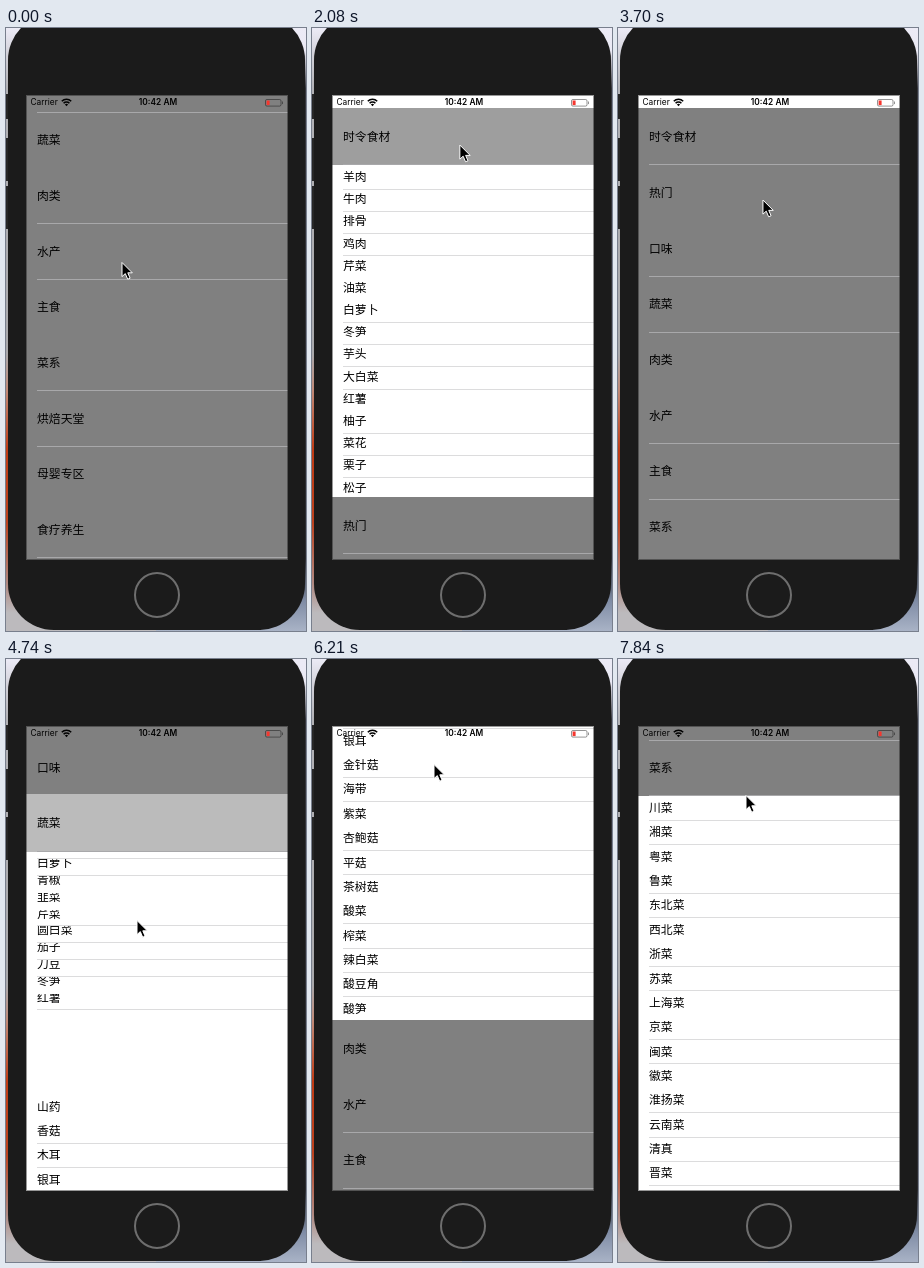
Write an HTML page that moves like this. It is 300 px wide and 603 px high and loops after 7.99 s.

```html
<!DOCTYPE html>
<html lang="zh-CN">
<head>
<meta charset="utf-8">
<title>分类列表</title>
<style>
html, body { margin: 0; width: 100%; height: 100%; overflow: hidden; }
body {
  position: relative;
  background: linear-gradient(#ecebf6, #b2b2b6 10%, #a9a9ac 54%, #c08a78 60%, #c03c16 70%, #bd4320 82%, #b08880 92%, #bcbabd 97%);
}
#desk {
  position: absolute; left: 150px; top: 0; width: 150px; height: 603px;
  background: linear-gradient(#ecebf6, #eae9f4 4%, #34343a 10%, #2a2a2e 88%, #7f8ca5 95%, #a9b3c6);
}
.key { position: absolute; left: 0; width: 4px; background: #262626; }
#phone {
  position: absolute; left: 2px; top: -14px; width: 297px; height: 616px;
  border-radius: 46px; background: #1b1b1b;
}
#home {
  position: absolute; left: 127.5px; top: 544px; width: 42px; height: 42px;
  border: 2px solid #6e6e6e; border-radius: 50%;
}
#screen {
  position: absolute; left: 20px; top: 67px; width: 262px; height: 465px;
  overflow: hidden; isolation: isolate; background: #fff;
}
#screen::after {
  content: ""; position: absolute; inset: 0; z-index: 999;
  box-shadow: inset 0 0 0 1px rgba(27, 27, 27, .45);
}
.cell {
  position: absolute; left: 0; top: 0; width: 262px; box-sizing: border-box;
  padding-left: 11px; white-space: nowrap; color: #000; background: #fff;
  font: 11.83px "Noto Sans CJK SC", "Noto Sans CJK", sans-serif;
}
.cell i { position: absolute; left: 11px; right: 0; bottom: 0; height: 1px; background: #dcdcdd; }
.head i { background: #a8a8aa; }
.row { line-height: 24px; }
.head { line-height: 56px; }
#bar {
  position: absolute; left: 0; top: 0; width: 262px; height: 14px; z-index: 900;
  font: 8.35px/15px Inter, sans-serif; color: #000;
}
#bar span { position: absolute; top: 0; white-space: nowrap; }
#bar svg { position: absolute; left: 0; top: 0; }
#clock { left: 82px; width: 100px; text-align: center; font-weight: 600; }
#mouse { position: absolute; left: 0; top: 0; overflow: visible; }
</style>
</head>
<body>
<div id="desk"></div>
<div class="key" style="top:66px;height:25px"></div>
<div class="key" style="top:110px;height:43px"></div>
<div class="key" style="top:158px;height:43px"></div>
<div id="phone"></div>
<div id="home"></div>
<div id="screen">
  <div id="bar">
    <span style="left:4.5px">Carrier</span>
    <span id="clock">10:42 AM</span>
    <svg width="262" height="14" fill="none">
      <g stroke="#000" stroke-width="1.6">
        <path d="M35.8 6.2a6.6 6.6 0 0 1 9.4 0M37.6 8.2a4.1 4.1 0 0 1 5.8 0"/>
        <path d="M40.5 11.2l-1.6-1.7a2.3 2.3 0 0 1 3.2 0z" fill="#000" stroke="none"/>
      </g>
      <rect x="239.5" y="4.5" width="15.5" height="6.6" rx="1.4" stroke="#000" stroke-opacity=".42"/>
      <path d="M256.5 6.5v2.6" stroke="#000" stroke-opacity=".42"/>
      <rect x="240.6" y="5.5" width="3" height="4.6" fill="#f5362e"/>
    </svg>
  </div>
</div>
<svg id="mouse" width="13" height="20">
  <path d="M1 1.5V15.6L4.3 12.6 6.7 18.2 9.1 17.2 6.8 11.8H11.3Z" fill="#000" stroke="#fff"/>
</svg>
<script>
const LOOP = 7990, TICKS = 54;
const HEAD = 55.68, ROW = 24.36, TOP = 13.8, VIEW = 465;
const OPEN = 3.85, REBUILD = 47;

const names = '时令食材 热门 口味 蔬菜 肉类 水产 主食 菜系 烘焙天堂 母婴专区 食疗养生'.split(' ');
const items = {
  0: '羊肉 牛肉 排骨 鸡肉 芹菜 油菜 白萝卜 冬笋 芋头 大白菜 红薯 柚子 菜花 栗子 松子',
  3: '白萝卜 青椒 韭菜 芹菜 圆白菜 茄子 刀豆 冬笋 红薯 土豆 山药 香菇 木耳 银耳 金针菇 海带 紫菜 杏鲍菇 平菇 茶树菇 酸菜 榨菜 辣白菜 酸豆角 酸笋',
  7: '川菜 湘菜 粤菜 鲁菜 东北菜 西北菜 浙菜 苏菜 上海菜 京菜 闽菜 徽菜 淮扬菜 云南菜 清真 晋菜 豫菜'
};

const easeOut = t => 1 - (1 - t) ** 1.6;
const smooth = t => t * t * (3 - 2 * t);
const frac = v => v - Math.floor(v);

function ramp(n, at, len, ease = smooth) {
  if (n >= at + len) return 1;
  return n <= at ? 0 : ease((n - at) / len);
}

// Times are in ticks of the loop
const taps = {
  0: { open: 11, close: 22, closeLen: 3 },
  3: { open: 30, close: REBUILD, closeLen: 0 },
  7: { open: 48, close: TICKS, closeLen: 0 }
};
const scrolls = [
  { at: 0, len: 7, y: -164.18 },
  { at: 30, len: 4, y: 3 * HEAD, ease: easeOut },
  { at: 37, len: 10, y: 767.8 },
  { at: REBUILD, len: 0, y: -917.54 },
  { at: 48, len: 3, y: 372.46, ease: easeOut }
];
const strokes = [
  { at: 0, len: 4, x: 1, y: 128 },
  { at: 4, len: 4, x: 3, y: -264 },
  { at: 11, len: 4, x: 33, y: 22 },
  { at: 17, len: 3, x: 1, y: -6.5 },
  { at: 22, len: 7, x: -23, y: 147.5 },
  { at: 34, len: 3, x: -4, y: 180 },
  { at: 37, len: 5, x: -5, y: -336 },
  { at: 42, len: 3, x: 0, y: 97 },
  { at: 52, len: 1, x: 6, y: -66 }
];
const travel = (moves, n, axis) =>
  moves.reduce((sum, m) => sum + m[axis] * ramp(n, m.at, m.len, m.ease), 0);

const openness = (tap, n) =>
  tap ? ramp(n, tap.open, OPEN, easeOut) - ramp(n, tap.close, tap.closeLen) : 0;
const glow = (tap, n) =>
  tap && n >= tap.open ? 1 - ramp(n, tap.open + 1, 3, t => t) : 0;

const screen = document.getElementById('screen');
const mouse = document.getElementById('mouse');

function cell(kind, text) {
  const el = document.createElement('div');
  el.className = 'cell ' + kind;
  el.textContent = text;
  const line = el.appendChild(document.createElement('i'));
  screen.append(el);
  return { el, line };
}

// Blank headers keep the list grey below the last name
const sections = [...names, '', '', ''].map((name, i) => ({
  head: cell('head', name),
  rows: items[i] ? ['', ...items[i].split(' ')].map(t => cell('row', t)) : [],
  fits: Math.floor((VIEW - TOP - (i + 1) * HEAD) / ROW)
}));

// Hairlines vanish at some subpixel phases, as the screen is shown scaled down
function place({ el, line }, y, size, phase, z) {
  const top = Math.floor(y), end = y + size;
  el.style.transform = `translateY(${top}px)`;
  el.style.height = Math.round(end) + 1 - top + 'px';
  el.style.zIndex = z;
  line.style.opacity = frac(end - phase) < .29 ? 0 : 1;
}

function render(n) {
  let y = TOP - 164.18 - travel(scrolls, n, 'y');
  sections.forEach(({ head, rows, fits }, i) => {
    const p = openness(taps[i], n), lit = glow(taps[i], n);
    const shade = Math.round(128 + 89 * lit);
    place(head, y, HEAD, .14, (lit > 0 ? 500 : 200) - i);
    head.el.style.background = `rgb(${shade},${shade},${shade})`;
    head.el.style.visibility = n >= REBUILD && i < 5 ? 'hidden' : 'visible';
    y += HEAD;
    rows.forEach((row, k) => {
      const j = k - 1;
      // Rows that start below the fold appear at their final place
      const late = j >= fits && p < 1;
      place(row, y + j * ROW * (late ? 1 : p), ROW, .53, 100 - j);
      row.el.style.visibility = p === 0 || (late && j === fits) ? 'hidden' : 'visible';
    });
    y += Math.max(0, rows.length - 1) * ROW * p;
  });
  const x = 115 + travel(strokes, n, 'x');
  mouse.style.transform = `translate(${x}px,${233 + travel(strokes, n, 'y')}px)`;
}

const start = performance.now();
let shown = -1;
function tick() {
  const t = (performance.now() - start) % LOOP;
  const n = Math.floor((t + 8) / (LOOP / TICKS)) % TICKS;
  if (n !== shown) render(shown = n);
  requestAnimationFrame(tick);
}
tick();
</script>
</body>
</html>
```
